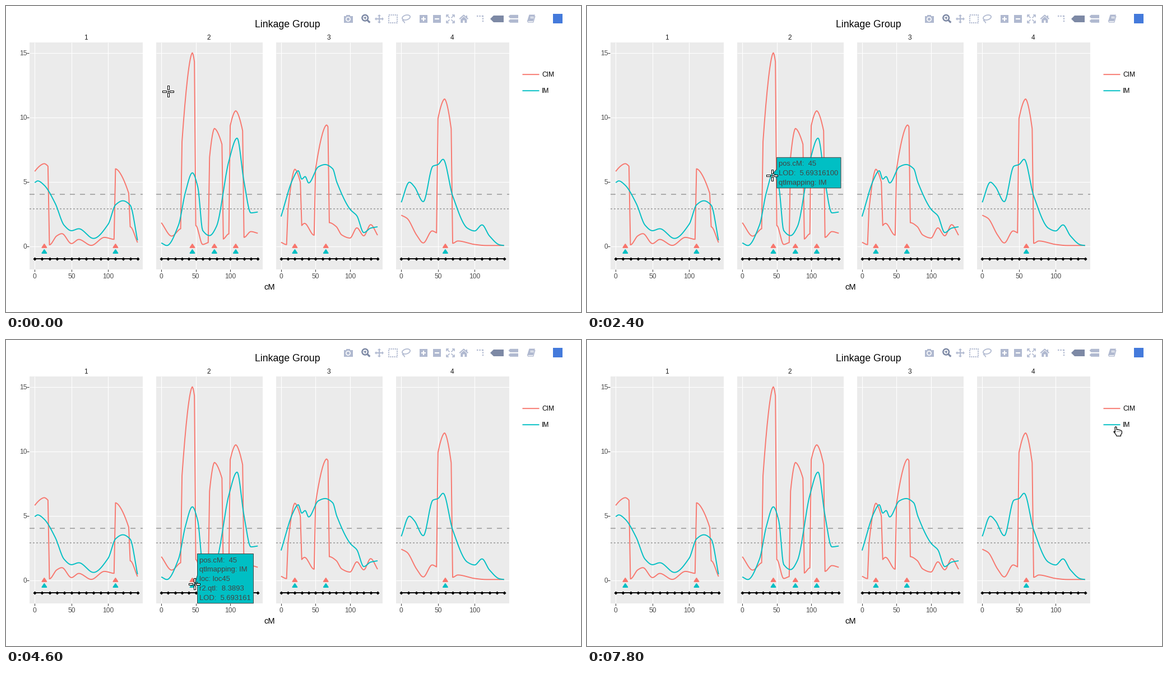
Recreate the animation shown at these times as a matplotlib script. Size 1026 by 546 pixels, loop 8 s.

```python
import math
import numpy as np
import matplotlib.pyplot as plt
from matplotlib.animation import FuncAnimation
from matplotlib.patches import Circle, Ellipse, Polygon, Rectangle

W, H, DPI = 1026, 546, 100
PT = 72 / DPI  # points per pixel
STEP_MS, STEPS = 200, 40

CIM, IM = "#F8766D", "#00BFC4"
PANEL, GREY, TICK = "#EBEBEB", "#A9A9A9", "#4D4D4D"
ICON, ICON_ON = "#B0B9D0", "#7D89A5"
TOP, BOTTOM = 65, 469.5
ZERO, UNIT = 428.5, 23
SIDES = ((1, 0), (-1, 0), (0, 1), (0, -1))

# left edge, right edge, pixel of 0 cM, pixels per cM, trait positions
PANELS = [
    (41.5, 243.5, 51.3, 1.31, (13, 110)),
    (267.5, 457.5, 277.2, 1.229, (45, 77, 108)),
    (481.5, 671.5, 490.8, 1.23, (20, 65)),
    (695.5, 898, 705.3, 1.31, (60,)),
]

plt.rcParams["font.family"] = "Liberation Sans"
plt.rcParams["lines.scale_dashes"] = False
fig = plt.figure(figsize=(W / DPI, H / DPI), dpi=DPI, facecolor="white")
ax = fig.add_axes([0, 0, 1, 1])
ax.set_xlim(0, W)
ax.set_ylim(H, 0)
ax.axis("off")


def line(xs, ys, color, width, z=3, **kw):
    kw.setdefault("solid_capstyle", "butt")
    return ax.plot(xs, ys, color=color, lw=width * PT, zorder=z, **kw)[0]


def rect(x0, y0, x1, y1, color, z=1, edge="none", width=0):
    return ax.add_patch(Rectangle((x0, y0), x1 - x0, y1 - y0, fc=color,
                                  ec=edge, lw=width * PT, zorder=z))


def poly(points, color, z=3, edge="none", width=0):
    return ax.add_patch(Polygon(points, fc=color, ec=edge, lw=width * PT,
                                joinstyle="round", zorder=z))


def disc(x, y, r, color, z=3):
    return ax.add_patch(Circle((x, y), r, fc=color, ec="none", zorder=z))


def ring(x, y, w, h, color, width, angle=0):
    return ax.add_patch(Ellipse((x, y), w, h, angle=angle, fc="none", ec=color,
                                lw=width * PT, zorder=3))


def label(x, y, s, size, color="black", ha="center", z=3):
    return ax.text(x, y, s, fontsize=size * PT, color=color, ha=ha,
                   va="baseline", zorder=z)


def lod_y(v):
    return ZERO - UNIT * v


def smooth(points, q):
    """Monotone cubic through the key points, evaluated at q."""
    x, y = np.array(points, float).T
    h, d = np.diff(x), np.diff(y) / np.diff(x)
    m = np.zeros_like(y)
    m[0], m[-1] = d[0], d[-1]
    same = d[:-1] * d[1:] > 0
    a, b = d[:-1][same], d[1:][same]
    m[1:-1][same] = 2 * a * b / (a + b)
    k = np.clip(np.searchsorted(x, q, side="right") - 1, 0, len(h) - 1)
    t = (q - x[k]) / h[k]
    return ((1 + 2 * t) * (1 - t) ** 2 * y[k] + t * t * (3 - 2 * t) * y[k + 1]
            + h[k] * t * (1 - t) * ((1 - t) * m[k] - t * m[k + 1]))


def curve(panel, color, base, peaks=()):
    """A smooth base; each peak (start, first, middle, top, last) replaces
    18 cM of it by an arch with steep 2 cM walls."""
    c = np.arange(141)
    v = smooth(base, c)
    keep = np.ones(141, bool)
    for start, first, middle, top, last in peaks:
        side = np.where(c < middle, start, start + 18)
        edge = np.where(c < middle, first, last)
        u = np.abs(c - middle) / np.maximum(np.abs(side - middle), 1)
        inside = (c >= start) & (c <= start + 18)
        v[inside] = (top - (top - edge) * u ** 1.65)[inside]
        keep &= (c != start - 1) & (c != start + 19)
    x0, scale = PANELS[panel][2:4]
    line(x0 + scale * c[keep], lod_y(v[keep]), color, 1.89, z=5,
         solid_joinstyle="round")


def draw_panels():
    label(502, 38, "Linkage Group", 17.7)
    label(470, 506, "cM", 14.6)
    for n, (left, right, x0, scale, traits) in enumerate(PANELS):
        rect(left, TOP, right, BOTTOM, PANEL)
        label((left + right) / 2 - 0.5, 60.5, str(n + 1), 11.9, "#1A1A1A")
        for v in (0, 5, 10, 15):
            line([left, right], [lod_y(v)] * 2, "white", 1.1, z=2)
        for c in (0, 50, 100):
            x = x0 + scale * c
            line([x, x], [TOP, BOTTOM], "white", 1.1, z=2)
            line([x, x], [BOTTOM + 0.5, BOTTOM + 4.5], "#333333", 1)
            label(x, 485.5, str(c), 12, TICK)
        for y, dash in ((335.5, 9), (361.5, 3)):
            line([left, right], [y, y], GREY, 1.9, z=4,
                 ls=(0, (dash * PT, dash * PT)), dash_capstyle="butt")
        xs = x0 + scale * np.arange(0, 141, 10)
        line(xs, [451] * 15, "black", 1.9, z=6, marker="D", ms=4.4 * PT, mew=0)
        for c in traits:
            x = x0 + scale * c
            for y, color in ((429, CIM), (439, IM)):
                poly([(x, y - 4), (x + 4, y + 2), (x - 4, y + 2)],
                     color, 6, color, 1.9)
    for v in (0, 5, 10, 15):
        line([37, 41], [lod_y(v)] * 2, "#333333", 1)
        label(37.2, lod_y(v) + 4.2, str(v), 12, TICK, "right")
    for y, color, name in ((122, CIM, "CIM"), (151, IM, "IM")):
        line([921.5, 951.5], [y + 0.2] * 2, color, 1.89, snap=False)
        label(956.3, y + 4.4, name, 12, ha="left")


def draw_toolbar():
    # camera
    rect(602.5, 17.5, 618.5, 29.5, ICON)
    rect(607, 15.5, 614, 18, ICON)
    disc(610.5, 23.5, 4.4, "white")
    disc(610.5, 23.5, 2.8, ICON)
    # magnifier
    ring(640.7, 21.2, 10.5, 10.5, ICON_ON, 2.5)
    line([644.5, 649.3], [25, 29.6], ICON_ON, 3.2)
    line([638, 643.4], [21.2, 21.2], ICON_ON, 1.5)
    line([640.7, 640.7], [18.5, 23.9], ICON_ON, 1.5)
    # pan
    line([660, 672], [23, 23], ICON, 2)
    line([666, 666], [17, 29], ICON, 2)
    for dx, dy in SIDES:
        x, y = 666 + 5 * dx, 23 + 5 * dy
        poly([(x + 3 * dx, y + 3 * dy), (x - 3 * dy, y + 3 * dx),
              (x + 3 * dy, y - 3 * dx)], ICON)
    # box and lasso selection
    line([683, 697.5, 697.5, 683, 683], [15.5, 15.5, 30, 30, 15.5], ICON, 2.1,
         ls=(0, (2.1 * PT, 1.5 * PT)), dash_capstyle="butt")
    ring(714, 20.5, 14.5, 8.5, ICON, 1.7, angle=-15)
    line([709, 707.8, 710, 711.5], [23.5, 26, 27.5, 30.5], ICON, 1.7)
    # zoom in and out
    for x, plus in ((744.5, True), (768.5, False)):
        rect(x - 7, 15.5, x + 7, 30, ICON)
        line([x - 4, x + 4], [22.8, 22.8], "white", 2.2, z=4)
        if plus:
            line([x, x], [18.8, 26.8], "white", 2.2, z=4)
    # autoscale
    for dx in (-1, 1):
        for dy in (-1, 1):
            x, y = 793 + 7 * dx, 22.8 + 7 * dy
            line([793 + 1.5 * dx, x], [22.8 + 1.5 * dy, y], ICON, 1.6)
            line([x - 4 * dx, x, x], [y, y, y - 4 * dy], ICON, 1.6)
    # home
    line([809.3, 816.8, 824.3], [23.2, 16.5, 23.2], ICON, 2)
    poly([(811.3, 24), (816.8, 19), (822.3, 24), (822.3, 30), (818.4, 30),
          (818.4, 25.5), (815.2, 25.5), (815.2, 30), (811.3, 30)], ICON)
    rect(820.5, 16.5, 822.5, 20.5, ICON)
    # spike lines
    dots = (0, (2.4 * PT, 2 * PT))
    line([840, 852.5], [18, 18], ICON, 2.2, ls=dots, dash_capstyle="butt")
    line([851.3, 851.3], [17, 29.5], ICON, 2.2, ls=dots, dash_capstyle="butt")
    # hover modes
    poly([(864, 23), (870, 17), (888, 17), (888, 29), (870, 29)], ICON_ON)
    for y in (18.8, 26.8):
        poly([(896.5, y), (899.5, y - 3), (914, y - 3), (914, y + 3),
              (899.5, y + 3)], ICON)
    # notebook
    poly([(933.5, 15.5), (944, 15.5), (940.5, 27), (930, 27)], ICON)
    line([930.3, 931.5, 940.8, 944], [26, 29, 29, 18], ICON, 1.3)
    for y in (18.6, 21.2):
        line([935, 941], [y, y], "white", 1, z=4)
    rect(975.5, 14, 992.5, 31, "#447ADB")


draw_panels()
draw_toolbar()

curve(0, CIM, [(0, 5.8), (20, .1), (30, .8), (37, .97), (50, .2), (60, .52),
               (77, .06), (95, .68), (108, .53), (130, 1.5), (140, .28)],
      [(0, 5.8, 13, 6.4, 6.2), (110, 6, 110, 6, 4.1)])
curve(0, IM, [(0, 4.93), (4, 5.06), (13, 4.72), (28, 3.3), (40, 1.62),
              (50, 1.2), (60, 1.35), (80, .6), (100, 1.7), (110, 3.2),
              (120, 3.52), (130, 3.18), (140, .45)])
curve(1, CIM, [(0, 1.82), (15, .78), (28, 1.35), (50, 1.6), (60, .13),
               (68, .28), (90, .55), (98, .95), (120, .68), (130, 1.13),
               (140, 1)],
      [(30, 8.1, 45, 15, 14.3), (70, 6.9, 77, 9.13, 7.9),
       (100, 9.35, 108, 10.5, 8.95)])
curve(1, IM, [(0, .25), (8, .05), (25, 1.65), (35, 4.2), (45, 5.69),
              (53, 4.57), (60, 1.22), (70, .82), (80, 1.53), (98, 6.6),
              (110, 8.38), (120, 5), (130, 2.58), (140, 2.65)])
curve(2, CIM, [(0, .3), (8, .12), (30, 1.6), (34, 1.77), (48, .85), (70, 1.82),
               (80, 1.52), (88, .87), (100, .63), (110, 1.42), (120, .8),
               (130, 1.67), (140, .85)],
      [(10, 2.8, 20, 5.97, 4.95), (50, 5.95, 66, 9.4, 9.27)])
curve(2, IM, [(0, 2.3), (17, 5.2), (25, 5.85), (30, 5.2), (35, 5.4), (40, 4.9),
              (54, 6.15), (64, 6.33), (75, 6), (81, 4.95), (100, 2.87),
              (110, 2.35), (120, 1.05), (130, 1.4), (140, 1.5)])
curve(3, CIM, [(0, 2.4), (8, 2.15), (21, .85), (30, .25), (42, 1.18),
               (48, 1.03), (70, .22), (77, .4), (100, .13), (116, .05),
               (140, .05)],
      [(50, 9.9, 59, 11.42, 9.1)])
curve(3, IM, [(0, 3.4), (11, 4.96), (18, 4.6), (30, 3.45), (43, 6.2),
              (50, 6.33), (57, 6.74), (70, 3.9), (90, 1.4), (100, 1.18),
              (110, 1.65), (120, .8), (134, .1), (140, .05)])

# pointer stops: step, x, y
STOPS = [(0, 289, 152), (4, 333, 87), (6, 333, 87), (9, 355.5, 238),
         (12, 330, 302), (17, 333, 303), (18, 337, 337), (22, 336, 435),
         (25, 336, 435), (27, 338, 460), (31, 366, 453), (34, 390, 453),
         (37, 912, 199), (39, 939, 154)]

# curve points under the pointer: first step, last step, name, cM, LOD
HOVERS = [(3, 7, "CIM", 46, 14.87406756), (8, 9, "CIM", 75, 8.9853321),
          (10, 17, "IM", 45, 5.693161), (18, 19, "IM", 53, 4.57006575)]


def pointer_at(step):
    for (a, xa, ya), (b, xb, yb) in zip(STOPS, STOPS[1:]):
        if step <= b:
            t = (1 - math.cos(math.pi * (step - a) / (b - a))) / 2
            return xa + (xb - xa) * t, ya + (yb - ya) * t


def tooltip(x, y, rows, color, gap=0):
    """Box right of (x, y), kept inside the panel, with a pointer to it."""
    ink = "white" if color == "black" else "#444444"
    tall = 16.9 * len(rows) + 3.8
    top = min(max(y - tall / 2, 64.5), 469.8 - tall)
    left, mid = x + gap + 6, top + tall / 2
    texts = [label(left + 3.4, top + 15 + 16.9 * i, s, 13, ink, "left", 22)
             for i, s in enumerate(rows)]
    renderer = fig.canvas.get_renderer()
    wide = 8.2 + max(t.get_window_extent(renderer).width for t in texts)
    box = poly([(x + gap, y), (left, mid + 6), (left, top + tall),
                (left + wide, top + tall), (left + wide, top), (left, top),
                (left, mid - 6)], color, 20, ink, 1)
    return texts + [box]


def crosshair(x, y):
    parts = [line([x - 1.5, x + 1.5], [y, y], "black", 1, 30),
             line([x, x], [y - 1.5, y + 1.5], "black", 1, 30)]
    for dx, dy in SIDES:
        cx, cy = x + 6.3 * dx, y + 6.3 * dy
        w, h = (3.3, 1.5) if dx else (1.5, 3.3)
        parts.append(rect(cx - w, cy - h, cx + w, cy + h, "white", 30,
                          "black", 1))
    return parts


def arrow(x, y):
    shape = [(0.5, 0.5), (0.5, 16.5), (4.2, 13), (7, 19.5), (9.5, 18.5),
             (6.8, 12.2), (12, 12.2)]
    return [poly([(x + a, y + b) for a, b in shape], "white", 30, "black", 1.1)]


def hand(x, y):
    shape = [(3, 1.7), (4.5, .6), (6, 1.7), (6, 6), (8, 5.6), (14, 7.4),
             (15.4, 9), (15.4, 12.5), (13.5, 15), (13.5, 17.4), (6, 17.4),
             (5, 15), (.8, 9.6), (2.2, 9), (3.4, 10.4)]
    parts = [poly([(x + a, y + b) for a, b in shape], "white", 30, "black", 1.2)]
    return parts + [disc(x + a, y + 9.4, .6, "black", 31) for a in (7, 9.5, 12)]


def hover(step, px):
    x0, scale = PANELS[1][2:4]
    for first, last, name, c, lod in HOVERS:
        if first <= step <= last:
            rows = [f"pos.cM: {c:3d}", f"LOD: {lod:11.8f}",
                    f"qtlmapping: {name}"]
            return tooltip(x0 + scale * c, lod_y(lod), rows,
                           CIM if name == "CIM" else IM)
    if 21 <= step <= 26:
        rows = ["pos.cM:  45", "qtlmapping: IM", "loc: loc45",
                "r2.qtl:  8.3893", "LOD:  5.693161"]
        return tooltip(x0 + scale * 45, 438, rows, IM, 3)
    if 27 <= step <= 34:
        k = math.floor((px - x0) / scale / 10 + 0.5)
        rows = [f"pos.cM: {10 * k:3d}", f"loc: M{16 + k}"]
        return tooltip(x0 + scale * 10 * k, 451, rows, "black", 3)
    return []


moving = []


def update(step):
    while moving:
        moving.pop().remove()
    x, y = pointer_at(step)
    pointer = hand if step >= 38 else arrow if step == 37 else crosshair
    moving.extend(hover(step, x) + pointer(x, y))
    return moving


anim = FuncAnimation(fig, update, frames=STEPS, interval=STEP_MS,
                     init_func=lambda: update(0), repeat=True, repeat_delay=0,
                     blit=False)
plt.show()
```
